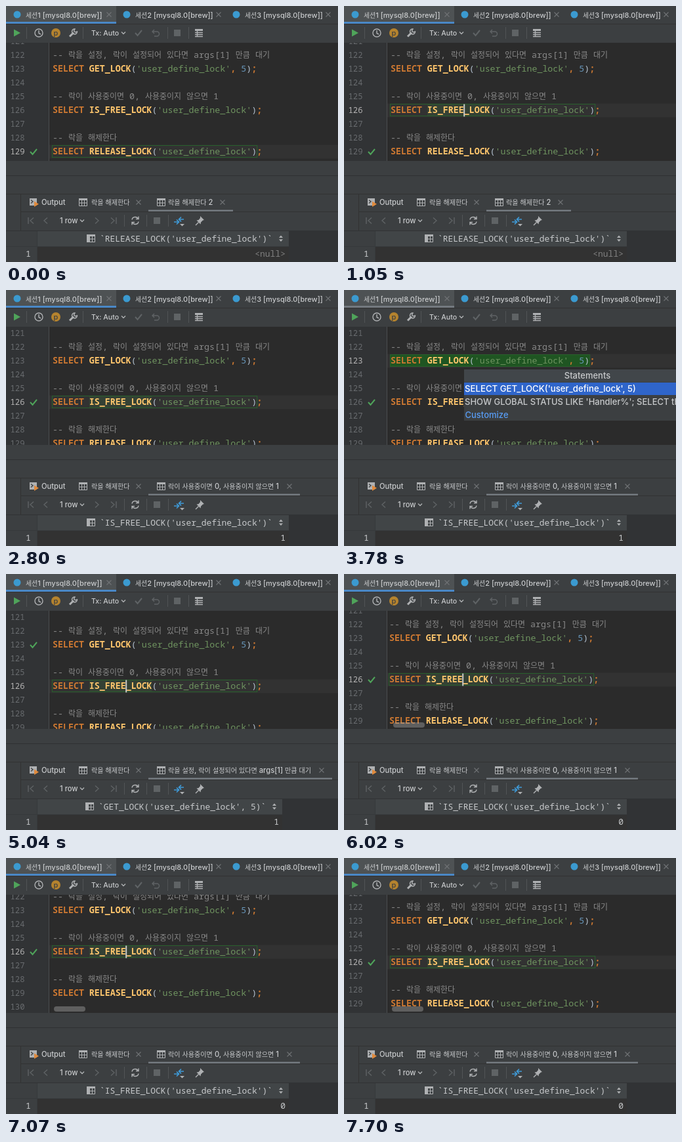
An HTML page for the animation above (8 s loop, 506 by 390 pixels).

```html
<!DOCTYPE html>
<html lang="ko">
<head>
<meta charset="utf-8">
<title>Lock sessions</title>
<style>
html, body { margin: 0; width: 100%; height: 100%; overflow: hidden; background: #3c3f41; }
svg { display: block; width: 506px; height: 390px; }
text { white-space: pre; font-family: Inter, 'Noto Sans CJK KR', sans-serif; font-weight: 500; fill: #c8cacc; }
.mono, .mono tspan { font-family: 'Noto Sans Mono', 'DejaVu Sans Mono', monospace; }
.code { font-size: 13.3px; fill: #b3c0cf; }
.number { font-size: 12.2px; fill: #686b6e; }
.number.on { fill: #b4b3b3; }
tspan.ko { font-family: 'Noto Sans CJK KR', 'Noto Sans CJK', sans-serif; font-size: .9em; }
.comment { fill: #888; }
.word { fill: #cc7832; font-weight: 600; }
.call { fill: #ffc66d; font-weight: 600; }
.string { fill: #6f9460; }
.digit { fill: #6897bb; }
.icon { fill: none; stroke: #afb1b3; stroke-width: 1.4; }
.dim { stroke: #5f6365; }
</style>
</head>
<body>
<svg viewBox="0 0 506 390">
  <defs><clipPath id="editor"><rect y="56" width="506" height="180"/></clipPath></defs>
  <g id="chrome"></g>
  <g id="code" clip-path="url(#editor)"></g>
  <g id="result"></g>
  <g id="overlay"></g>
</svg>
<script>
const LOOP = 8000, STEP = 70, PITCH = 21, CHAR = 7.98, CODE_X = 71;
const $ = id => document.getElementById(id);

const source = {
  122: '-- 락을 설정, 락이 설정되어 있다면 args[1] 만큼 대기',
  123: "SELECT GET_LOCK('user_define_lock', 5);",
  125: '-- 락이 사용중이면 0, 사용중이지 않으면 1',
  126: "SELECT IS_FREE_LOCK('user_define_lock');",
  128: '-- 락을 해제한다',
  129: "SELECT RELEASE_LOCK('user_define_lock');"
};

const freeTab = { tab: '락이 사용중이면 0, 사용중이지 않으면 1', close: 432, call: "IS_FREE_LOCK('user_define_lock')", edge: 431 };
const results = {
  released: { tab: '락을 해제한다 2', close: 330, call: "RELEASE_LOCK('user_define_lock')", edge: 431, value: '<null>' },
  free: { ...freeTab, value: '1' },
  locked: { tab: '락을 설정, 락이 설정되어 있다면 args[1] 만큼 대기', close: 481, call: "GET_LOCK('user_define_lock', 5)", edge: 421, value: '1' },
  busy: { ...freeTab, value: '0' }
};

const events = [
  [0, { line: 129, check: 129, result: 'released', fill: false, popup: false, caret: false, bar: false }],
  [700, { line: 126, caret: true }],
  [1330, { popup: true, fill: true, caret: false }],
  [1610, { popup: false }],
  [1750, { fill: false, result: 'free', check: 126 }],
  [3010, { line: 123, caret: true }],
  [3500, { popup: true, fill: true, caret: false }],
  [3850, { popup: false }],
  [3920, { fill: false, result: 'locked', check: 123 }],
  [4480, { line: 126, caret: true }],
  [5110, { popup: true, fill: true, caret: false }],
  [5390, { popup: false }],
  [5530, { fill: false, result: 'busy', check: 126 }],
  [5880, { caret: true, bar: true }],
  [6370, { caret: false }],
  [7000, { caret: true }],
  [7700, { caret: false }]
];

const scrollKeys = [[0, 0], [2380, 0], [2800, 12], [5810, 12], [6020, 2], [6230, -3], [6300, -3],
  [6580, -23], [6860, -26], [6930, -26], [7280, 0], [LOOP, 0]];

function scrollAt(t) {
  const i = scrollKeys.findIndex(k => k[0] > t);
  const [t0, a] = scrollKeys[i - 1], [t1, b] = scrollKeys[i];
  return Math.round(a + (b - a) * (t - t0) / (t1 - t0));
}

const rect = (x, y, w, h, fill, more = '') => `<rect x="${x}" y="${y}" width="${w}" height="${h}" fill="${fill}" ${more}/>`;
const icon = (d, cls = '') => `<path class="icon ${cls}" d="${d}"/>`;
const solid = (d, fill) => `<path d="${d}" fill="${fill}"/>`;
const escape = s => s.replace(/</g, '&lt;').replace(/>/g, '&gt;');
const hangul = s => s.replace(/[가-힣]+/g, m => `<tspan class="ko">${m}</tspan>`);
const label = (x, y, s, size = 11.2, more = '') => `<text x="${x}" y="${y}" font-size="${size}" ${more}>${hangul(escape(s))}</text>`;
const cross = (x, y) => `<path d="M${x - 3.5} ${y - 3.5}l7 7m0-7l-7 7" stroke="#707375" stroke-width="1.1"/>`;
const divider = (x, y) => rect(x, y - 9, 1, 18, '#515456');
const table = (x, y) => rect(x, y, 13, 3, '#afb1b3') +
  `<path d="M${x + .5} ${y + 3}v8.5h12V${y + 3}M${x} ${y + 7}h13M${x + 4.5} ${y + 3}v9m4-9v9" class="icon" style="stroke-width:1"/>`;
const tick = (x, y, color) => `<path d="M${x - 5} ${y}l3.5 4 6.5-8" fill="none" stroke="${color}" stroke-width="2"/>`;

function highlight(s) {
  if (s.startsWith('--')) return `<tspan class="comment">${hangul(s)}</tspan>`;
  return s.replace(/(SELECT|[;,])|([A-Z_]{4,})|('\w+')|(\d)/g, (m, word, call, string) =>
    `<tspan class="${word ? 'word' : call ? 'call' : string ? 'string' : 'digit'}">${m}</tspan>`);
}

function drawChrome() {
  let s = rect(0, 0, 168, 27, '#4e5254');
  [0, 167, 334].forEach((x, i) => {
    s += `<circle cx="${x + 17}" cy="13" r="5.5" fill="#3b9ad0"/>`;
    s += label(x + 30, 17.5, `세션${i + 1} [mysql8.0[brew]]`, 11) + cross(x + 157, 13);
  });
  s += rect(0, 27, 506, 1, '#323232');

  // Editor toolbar
  s += solid('M12 35.5v11l10-5.5z', '#4fa45a');
  s += icon('M56 41a6 6 0 1 1-12 0a6 6 0 1 1 12 0M50 37v4.5l3 1.5');
  s += '<circle cx="76" cy="41" r="7" fill="#b5832e"/>' + label(76, 44.5, 'p', 11, 'text-anchor="middle" style="fill:#3c3f41"');
  s += '<path d="M97 46.5l6-6" stroke="#afb1b3" stroke-width="3"/>' + icon('M105 35a4 4 0 1 0 3.5 4l-3 1-2-2z');
  s += label(130, 45, 'Tx: Auto', 10.6) + icon('M176 39.5l3 3 3-3') + tick(202, 41, '#5f6365');
  s += icon('M226 36l-3 3 3 3M223.500 39h6.500a3.500 3.500 0 0 1 0 7h-4', 'dim');
  s += rect(256, 36, 10, 10, '#5f6365');
  s += rect(288, 35, 12, 3, '#afb1b3') + icon('M288 40.500h12M288 43.500h12M288 46.500h12M291.500 38v9');
  s += [31, 117, 246, 278].map(x => divider(x, 41)).join('');

  s += rect(0, 56, 506, 180, '#2b2b2b') + rect(0, 56, 66, 180, '#313335') + rect(65, 56, 1, 180, '#4b4d4f');
  s += rect(0, 258, 506, 1, '#2f3133') + rect(0, 286, 506, 1, '#323232');

  // Result panel
  s += rect(22, 287, 1, 103, '#323232') + rect(23, 313, 483, 1, '#323232');
  s += rect(36, 293, 11, 11, '#afb1b3') + '<path d="M38 295.500l3 2.500-3 2.500" fill="none" stroke="#3c3f41" stroke-width="1.3"/>';
  s += solid('M43 297.500v8.500l7-4.250z', '#e08a3c') + label(54, 303, 'Output');
  s += table(111, 293) + label(130, 303, '락을 해제한다') + cross(202, 299);
  s += icon('M34 322v10M42 322.500l-5 4.500 5 4.500M63 322.500l-5 4.500 5 4.500M136 322.500l5 4.500-5 4.500M160 322.500l5 4.500-5 4.500M168 322v10', 'dim');
  s += label(82, 331, '1 row') + icon('M113 325.500l3 3 3-3');
  s += icon('M192 325.500a5 5 0 0 1 9.500-1M202 328.500a5 5 0 0 1-9.500 1M202 320.500v4h-4M192 333.500v-4h4');
  s += rect(225, 322, 10, 10, '#5f6365');
  s += '<path d="M256 329h7m1-4h7M260 325.500l3.500 3.500-3.500 3.500M267 321.500l-3.500 3.500 3.500 3.500" fill="none" stroke="#3f9bd8" stroke-width="1.7"/>';
  s += solid('M265 332h7l-3.500 3.500z', '#afb1b3');
  s += solid('M296 320l6 6-2 .5-3 3-.5 3-6-6 3-.5 2.500-3z', '#afb1b3') + icon('M293.500 329.500l-4.500 4.500');
  s += [180, 214, 247].map(x => divider(x, 327)).join('');
  return s;
}

function drawCode(state, scroll, shift) {
  const left = CODE_X - shift;
  let s = '';
  for (let n = 119; n <= 130; n++) {
    const y = 159 + (n - 126) * PITCH + scroll, text = source[n], on = n === state.line;
    if (on) {
      const width = (text.length - 1) * CHAR;
      s += rect(66, y - 10.5, 440, PITCH, '#323232');
      if (state.fill) s += rect(left, y - 9, width, 18, '#1f5522');
      else if (n === 126) s += rect(left + 7 * CHAR, y - 9, 12 * CHAR, 18, '#344134');
      s += rect(left - .5, y - 9.5, width + 1, 18, 'none', 'stroke="#28602c"');
    }
    s += `<text class="mono number ${on ? 'on' : ''}" x="28.500" y="${y + 4}" text-anchor="end">${n}</text>`;
    if (text) s += `<text class="mono code" x="${left}" y="${y + 4}">${highlight(text)}</text>`;
    if (n === state.check) s += tick(42, y, '#4fa45a');
    if (on && state.caret) s += rect(left + 14 * CHAR - .5, y - 9.5, 2, 19, '#c8c8c8');
  }
  if (state.bar) s += rect(73 + shift, 226, 48, 8, '#a6a6a6', 'fill-opacity=".42" rx="4"');
  return s;
}

function drawResult({ tab, close, call, edge, value }) {
  let s = rect(217, 310.5, close - 201, 2.5, '#747a80');
  s += table(230, 293) + label(247, 303, tab) + cross(close, 299);
  s += rect(0, 342, 506, 48, '#313335') + rect(0, 343, 47, 47, '#3c3f41');
  s += rect(47, 343, edge - 47, 23, '#414547') + rect(47, 366, edge - 47, 24, '#323232');
  s += rect(0, 366, edge, 1, '#36393b') + rect(47, 343, 1, 47, '#36393b');
  const x = edge === 431 ? 143 : 141;
  s += table(x - 20, 348) + rect(x - 20, 348, 4, 12, '#afb1b3');
  s += `<text class="mono" x="${x}" y="359" font-size="12.9">\`${call}\`</text>`;
  s += solid(`M${edge - 15} 353l3-3.500 3 3.500zm0 2.500h6l-3 3.500z`, '#afb1b3');
  s += '<text class="mono" x="30" y="382" font-size="13">1</text>';
  const color = value === '<null>' ? '#808080' : '#c8cacc';
  return s + `<text class="mono" x="${edge - 5}" y="382" font-size="13" text-anchor="end" style="fill:${color}">${escape(value)}</text>`;
}

function drawOverlay(state, scroll) {
  let s = rect(0, 24, 168, 3, state.popup ? '#747a80' : '#4a88c7');
  if (!state.popup) return s;
  const y = 172 + (state.line - 126) * PITCH + scroll;
  s += rect(183, y, 375, 78, '#3c3f41');
  s += rect(183, y, 375, 19, '#41464a') + rect(183, y + 20, 375, 19, '#2f65ca');
  s += label(371, y + 13.5, 'Statements', 13, 'text-anchor="middle"');
  s += label(184, y + 34, source[state.line].slice(0, -1), 13.2, 'style="fill:#fff"');
  s += label(184, y + 54, "SHOW GLOBAL STATUS LIKE 'Handler%'; SELECT the", 13);
  return s + label(184.5, y + 74, 'Customize', 13, 'style="fill:#589df6"');
}

let lastKey = '';
function render(time) {
  const t = Math.floor(time % LOOP / STEP) * STEP;
  const state = Object.assign({}, ...events.filter(e => e[0] <= t).map(e => e[1]));
  const scroll = scrollAt(t), shift = t >= 5950 && t < 6230 ? 2 : 0;
  const key = JSON.stringify([state, scroll, shift]);
  if (key === lastKey) return;
  lastKey = key;
  $('code').innerHTML = drawCode(state, scroll, shift);
  $('result').innerHTML = drawResult(results[state.result]);
  $('overlay').innerHTML = drawOverlay(state, scroll);
}

$('chrome').innerHTML = drawChrome();
const start = performance.now();
function tickFrame() {
  render(performance.now() - start);
  requestAnimationFrame(tickFrame);
}
tickFrame();
</script>
</body>
</html>
```
